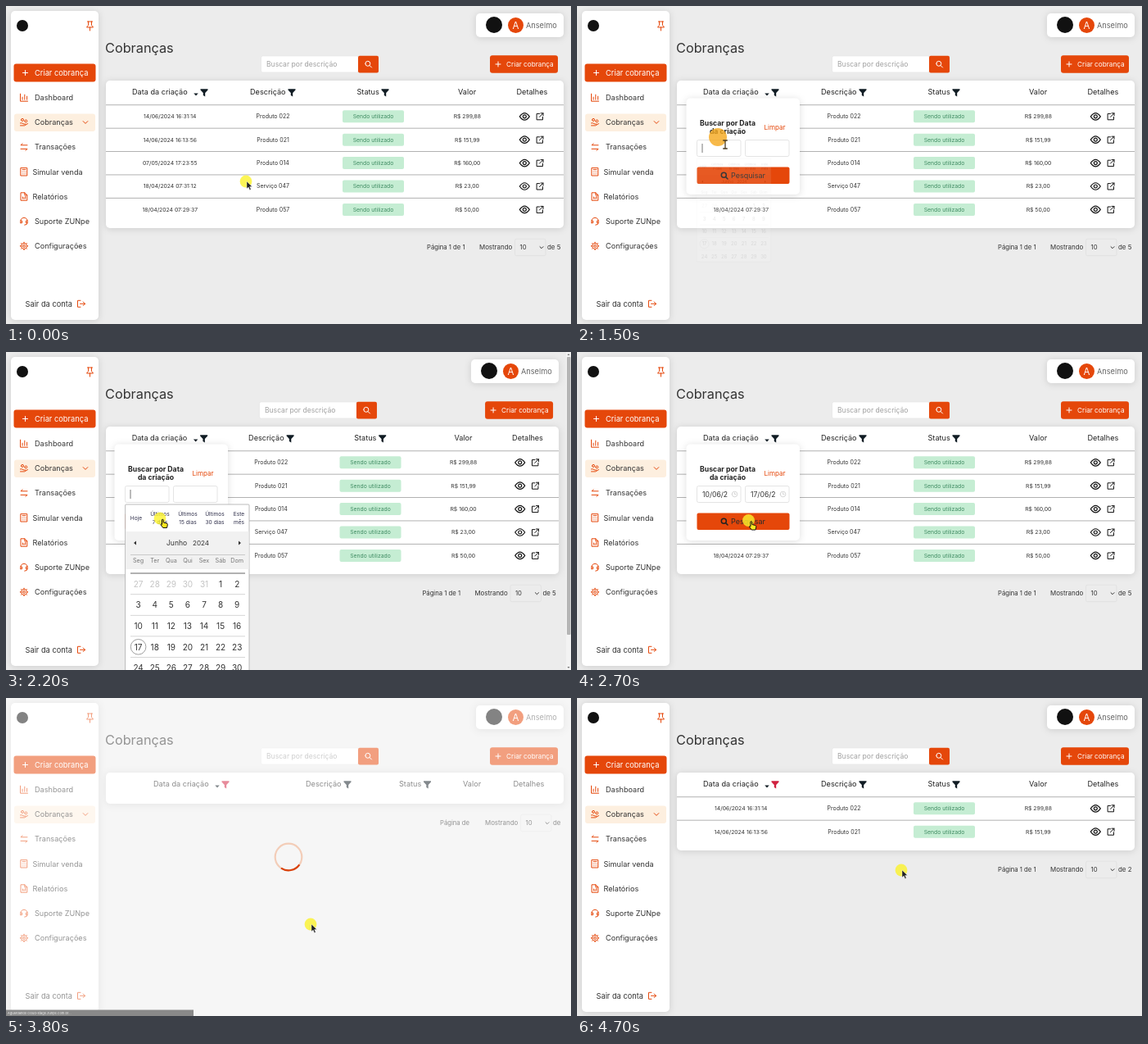
An HTML page that plays this animation: 690 px wide and 388 px high, repeating every 5.7 s.

```html
<!DOCTYPE html>
<html lang="pt-BR">
<head>
<meta charset="utf-8">
<title>Cobranças</title>
<style>
html, body { margin: 0; height: 100%; overflow: hidden; background: #ececec }
svg { display: block; width: 100vw; height: 100vh; font-family: Inter, "Open Sans", sans-serif }
.card { fill: #fff; filter: drop-shadow(0 1px 4px #0002) }
</style>
</head>
<body>
<svg id="stage" viewBox="0 0 690 388"></svg>
<script>
const LOOP = 5700, STEP = 100;
const ORANGE = '#e5470a', INK = '#333', DARK = '#111c24';
const stage = document.getElementById('stage');

const rect = (x, y, w, h, fill, r = 0, more = '') =>
  `<rect x="${x}" y="${y}" width="${w}" height="${h}" rx="${r}" fill="${fill}" ${more}/>`;
const card = (x, y, w, h) => rect(x, y, w, h, '#fff', 5, 'class="card"');
const disc = (x, y, r, fill, more = '') => `<circle cx="${x}" cy="${y}" r="${r}" fill="${fill}" ${more}/>`;
const text = (x, y, s, size, fill = INK, more = '') =>
  `<text x="${x}" y="${y}" font-size="${size}" fill="${fill}" ${more}>${s}</text>`;
const mid = (x, y, s, size, fill, more = '') => text(x, y, s, size, fill, 'text-anchor="middle" ' + more);
const line = (x, y, d, color = ORANGE, w = 1) =>
  `<path transform="translate(${x} ${y})" d="${d}" fill="none" stroke="${color}" stroke-width="${w}" stroke-linecap="round" stroke-linejoin="round"/>`;
const solid = (x, y, d, fill) => `<path transform="translate(${x} ${y})" d="${d}" fill="${fill}"/>`;
const group = (s, more) => `<g ${more}>${s}</g>`;
const ring = (x, y, r) => `M${x - r} ${y}a${r} ${r} 0 1 0 ${2 * r} 0a${r} ${r} 0 1 0 ${-2 * r} 0`;

const plus = (x, y) => line(x, y, 'M-3 0h6M0-3v6', '#fff');
const lens = (x, y, color, w) => line(x, y, ring(-.7, -.7, 3) + 'M1.6 1.6l2.4 2.4', color, w);
const funnel = (x, y, fill) => solid(x, y, 'M-4.5-4.5h9v1.2l-3.3 3.6v4.4l-2.4-1.6v-2.8l-3.3-3.6z', fill);
const chevron = (x, y, color, r = 2.8) => line(x, y, `M${-r} ${-r / 2}l${r} ${r}l${r} ${-r}`, color);

const MENU = [
  ['Dashboard', 35, 'M-4.5-4.5v9h9M-2 2.5v-3M.8 2.5v-6M3.6 2.5v-4'],
  ['Cobranças', 35, ring(-2, -3, 1.5) + ring(2.3, -1.5, 1.5) + 'M-4.5 1h2l2.5 1.2h2M-4.5 4h5l4-2.3'],
  ['Transações', 35, 'M4-2.3h-8l2-2M-4 2.3h8l-2 2'],
  ['Simular venda', 32.5, 'M-3.8-4.7h7.6v9.4h-7.6zM-2-2.6h4M-2 0h.1M0 0h.1M2 0h.1M-2 2.5h.1M0 2.5h.1M2 2.5h.1'],
  ['Relatórios', 32.5, 'M-3.6-4.7h4.4l3 3v6.4h-7.4zM.8-4.7v3h3M-1.6 2.5v-2M0 2.5v-1M1.7 2.5v-3'],
  ['Suporte ZUNpe', 35, 'M-4.2 2v-2.2a4.2 4.2 0 0 1 8.4 0v2.2h-1.8v-2.6h1.8M-4.2 2h1.8v-2.6h-1.8M4.2 2q0 2.5-3.5 2.5'],
  ['Configurações', 35, ring(0, 0, 1.5) + ring(0, 0, 3.6) + 'M0-4.8v1M0 4.8v-1M-4.8 0h1M4.8 0h-1M-3.4-3.4l.7.7M3.4 3.4l-.7-.7M3.4-3.4l-.7.7M-3.4 3.4l.7-.7']
];
const ROWS = [
  ['14/06/2024 16:31:14', 'Produto 022', '299,88'],
  ['14/06/2024 16:13:56', 'Produto 021', '151,99'],
  ['07/05/2024 17:23:55', 'Produto 014', '160,00'],
  ['18/04/2024 07:31:12', 'Serviço 047', '23,00'],
  ['18/04/2024 07:29:37', 'Produto 057', '50,00']
];

function sidebar() {
  let s = card(6, 6, 107, 377) + disc(20, 24, 7, '#111');
  s += line(102.5, 24, 'M-3-5h6M-2-5v4.5l-2 2.5h8l-2-2.5v-4.5M0 2v4');
  s += rect(9.5, 70.5, 100, 22, ORANGE, 3) + plus(23.5, 81.5) + text(35, 84.8, 'Criar cobrança', 9.3, '#fff');
  s += rect(10, 131.5, 99, 21.5, '#fdefdf', 3) + chevron(97, 142, ORANGE);
  MENU.forEach(([name, x, icon], i) => {
    const y = 111.7 + i * 30.2;
    s += line(22, y, icon) + text(x, y + 3.3, name, 9.15);
  });
  return s + text(23.5, 366.5, 'Sair da conta', 9.25) +
    line(92, 363.3, 'M-1-4h-3.5v8h3.5M-1.5 0h6M2.2-2.3l2.3 2.3l-2.3 2.3');
}

// The scrollbar narrows the page; things move left in proportion to x.
function page({ scrolled, rows, red, empty }) {
  const X = x => scrolled ? x - (x - 122) / 93 : x;
  const at = (x, s) => group(s, `transform="translate(${X(x) - x} 0)"`);
  let s = at(681, card(574, 9, 107, 29) + disc(596, 23, 10, '#111') + disc(622.5, 23.5, 9.5, ORANGE) +
    mid(622.5, 27.7, 'A', 11.5, '#fff') + text(635, 27, 'Anselmo', 9.2, '#666'));
  s += text(121, 56.8, 'Cobranças', 16.3);
  s += at(311, rect(311.5, 61, 119, 20, '#fff', 2, 'stroke="#e2e2e2" stroke-width=".6"') +
    text(318, 74.3, 'Buscar por descrição', 8.55, '#a0a0a0') +
    rect(430, 60.7, 25, 20.8, ORANGE, 2) + lens(442.5, 71, '#fff'));
  s += at(673, rect(591, 60.2, 83, 21.6, ORANGE, 3) + plus(601, 71) + text(611, 74, 'Criar cobrança', 8.2, '#fff'));

  const height = empty ? 38 : rows > 2 ? 180 : 95;
  s += card(122, 91, X(681) - 122, height);
  const heads = [['Data da criação', 154, 180, 88], ['Descrição', 298, 366, 51],
    ['Status', 428.5, 480, 34.5], ['Valor', 552, 558], ['Detalhes', 623.5, 619.5]];
  heads.forEach(([name, full, bare, gap], i) => {
    const x = empty ? bare : full;
    s += at(x, text(x, 108.4, name, 9.15, '#222') +
      (gap ? funnel(x + gap, 105.8, i || !red ? DARK : '#d0213f') : '') +
      (i ? '' : solid(x + 78, 108, 'M-2.7-1.4h5.4l-2.7 2.8z', DARK)));
  });
  for (let i = 0; i < rows; i++) {
    const y = 134.8 + i * 28.4, [date, name, value] = ROWS[i];
    s += rect(122, y - 14.5, X(681) - 122, .9, '#aaa');
    s += at(200, mid(200.3, y + 2.4, date, 6.8)) + at(326, mid(326, y + 2.4, name, 7));
    s += at(448, rect(411, y - 7.5, 75, 15, '#c5edd3', 2) + mid(448.5, y + 2.4, 'Sendo utilizado', 6.8, '#3f8b62'));
    s += at(563, mid(563.3, y + 2.4, 'R$ ' + value, 6.8));
    s += at(642, line(633.3, y, 'M-6 0q6-8.5 12 0q-6 8.5-12 0z' + ring(0, 0, 2), '#111', 1.2) +
      line(652, y, 'M-.5-3.4h-3.4v7.4h7.4v-3.4M1-4h3v3M4-4l-4.6 4.6', '#111'));
  }

  const y = 91 + height + 23.7, total = empty ? '' : rows;
  const dx = empty ? 7 : 0;
  s += at(640, group(
    text(empty ? 523 : 514, y + 2.7, empty ? 'Página de' : 'Página 1 de 1', 7.7) +
    text(578, y + 2.7, 'Mostrando', 7.9) +
    rect(621.5, y - 10.5, 37.5, 20.5, 'none', 2, 'stroke="#dedede" stroke-width=".7"') +
    text(627.5, y + 2.7, '10', 7.7) + chevron(654, y, INK, 2) + text(661, y + 2.7, 'de ' + total, 7.9),
    `transform="translate(${dx} 0)"`));
  if (scrolled) s += rect(684, 0, 6, 388, '#f3f3f3') + rect(685, 6, 4.5, 339, '#b5b5b5', 1) +
    solid(687, 3, 'M-1.5 1h3l-1.5-2z', '#777') + solid(687, 385, 'M-1.5-1h3l-1.5 2z', '#777');
  return s;
}

function popup({ filled, caret, hover }) {
  let s = card(133.5, 112.5, 138.5, 117.5);
  s += mid(184, 145.6, 'Buscar por Data', 8.7, '#222', 'font-weight="700"') +
    mid(184, 156.2, 'da criação', 8.7, '#222', 'font-weight="700"') + text(228.5, 151, 'Limpar', 8, ORANGE);
  [[146.5, '10/06/2'], [205.5, '17/06/2']].forEach(([x, date]) => {
    s += rect(x, 163.5, 53.5, 20, '#fff', 2, 'stroke="#ddd" stroke-width=".8"');
    if (filled) s += text(x + 6.5, 176.7, date, 8.6) + rect(x + 37.5, 165, 14, 17, '#fff') +
      line(x + 46, 173.5, ring(0, 0, 3.3) + 'M0-1.8v1.8h1.5', '#ccc', .8);
  });
  if (caret) s += rect(152.6, 168, .8, 11, '#555');
  return s + rect(146.5, 196.5, 113, 20.5, hover ? '#e95721' : ORANGE, 2) +
    lens(180, 207, '#222', 1.5) + text(188, 210.2, 'Pesquisar', 9, '#2b2b2b');
}

function calendar() {
  let s = rect(145.6, 186, 151.4, 210, '#fff', 1, 'stroke="#aaa" stroke-width=".8"') +
    rect(146, 219, 150.5, 46, '#f1f1f1');
  const presets = [['Hoje', 159], ['Últimos', 188, '7 dias'], ['Últimos', 222, '15 dias'],
    ['Últimos', 255, '30 dias'], ['Este', 284.5, 'mês']];
  for (const [top, x, low] of presets)
    s += mid(x, low ? 200.3 : 205, top, 6.6, '#2e2e4a') + (low ? mid(x, 210, low, 6.6, '#2e2e4a') : '');
  s += text(196, 236, 'Junho', 8.5) + text(228, 236, '2024', 8.1) +
    solid(157.5, 233, 'M1.5-2.5v5l-3-2.5z', INK) + solid(285.5, 233, 'M-1.5-2.5v5l3-2.5z', INK) +
    rect(152, 247.3, 140, .7, '#bbb') + rect(152, 269.5, 140, 1, '#666');
  'Seg Ter Qua Qui Sex Sáb Dom'.split(' ').forEach((d, i) => s += mid(161.6 + i * 20.1, 257, d, 7.2, '#777'));
  for (let i = 0; i < 35; i++) {
    const x = 161.6 + i % 7 * 20.1, y = 283 + Math.floor(i / 7) * 25.6, day = i < 5 ? 27 + i : i - 4;
    if (i % 7 === 0) s += rect(152, y + 12.3, 140, .8, '#ccc');
    if (day === 17) s += disc(x, y, 9.3, 'none', 'stroke="#888" stroke-width=".8"');
    s += mid(x, y + 3.7, day, 10, i < 5 ? '#c4c4c4' : INK);
  }
  return s;
}

const PATH = [[0, 293, 214], [600, 240, 105], [1100, 240, 105], [1400, 172, 160], [1700, 172, 160],
  [2200, 188, 203], [2400, 188, 203], [3000, 231, 208], [3500, 231, 208], [3800, 372, 276],
  [4100, 395, 207], [4700, 396, 210], [LOOP, 396, 210]];
const CLICKS = [[700, 900, 11], [1500, 1600, 11], [2400, 2500, 11], [3200, 3300, 8.5]];

function pointer(t) {
  const i = PATH.findIndex(p => p[0] > t), [a, ax, ay] = PATH[i - 1], [b, bx, by] = PATH[i];
  const u = (t - a) / (b - a), k = u * u * (3 - 2 * u);
  const x = ax + (bx - ax) * k, y = ay + (by - ay) * k;
  const click = CLICKS.find(([from, to]) => t >= from && t < to);
  let s = disc(x, y, click ? click[2] : 7.4, click ? '#f5a81c' : '#fbf32c', 'opacity=".8"');
  if (t >= 1300 && t < 1800)
    return s + line(x + 9, y + 9, 'M-2.3-5h4.6M0-5v10M-2.3 5h4.6', '#4a3a20', 1.3);
  const hand = t >= 500 && t < 3600;
  const shape = hand
    ? 'M2.5 1.5q1.3-1 1.8.5v3l4 1q1.2.4 1 1.8l-.8 3.7h-4.8l-2.9-4q.3-1 1.7-.1z'
    : 'M1 0v9l2.1-1.9l1.5 3.3l1.6-.7l-1.5-3.2h2.9z';
  return s + `<path transform="translate(${x} ${y})" d="${shape}" fill="${hand ? '#ffe81f' : '#222'}" stroke="${hand ? '#111' : '#fff'}" stroke-width="${hand ? 1 : .4}"/>`;
}

const within = (t, a, b) => t >= a && t < b;

function scene(t) {
  const loading = within(t, 3600, 4000);
  const scrolled = within(t, 1600, 2600);
  let s = rect(0, 0, 690, 388, '#ececec') + sidebar() + page({
    scrolled, empty: loading, red: t >= 3200,
    rows: loading ? 0 : t < 3600 ? 5 : 2
  });
  if (within(t, 900, 3600)) {
    const shift = scrolled ? -1 : 0;
    s += group(popup({ filled: t >= 2500, caret: within(t, 1500, 2500), hover: t >= 2900 }),
      `opacity="${t < 1000 ? .6 : 1}" transform="translate(${shift} 0)"`);
  }
  if (within(t, 1500, 2600)) {
    const [alpha, size] = t === 1500 ? [.1, .6] : t === 1600 ? [.8, .93] : t === 2500 ? [.4, 1] : [1, 1];
    s += group(calendar(), `opacity="${alpha}" transform="translate(146.5 186) scale(${size}) translate(-146.5 -186)"`);
  }
  if (within(t, 3200, 4000))
    s += rect(0, 380.5, 229, 8, '#1c1c1c') + text(2, 386, 'Aguardando cloud-stage.zunpe.com.br...', 4, '#ddd');
  if (within(t, 3600, 4100)) s += rect(0, 0, 690, 388, '#fff', 0, `opacity="${t < 4000 ? .48 : .2}"`);
  if (loading) s += disc(345, 194, 16.3, 'none', 'stroke="#f3cdb8" stroke-width="2.2"') +
    disc(345, 194, 16.3, 'none', `stroke="#d9420d" stroke-width="2.2" stroke-dasharray="25 100" transform="rotate(${35 + (t - 3800) * .36} 345 194)"`);
  return s + pointer(t);
}

let shown = -1;
function tick() {
  const t = Math.floor(performance.now() % LOOP / STEP) * STEP;
  if (t !== shown) stage.innerHTML = scene(shown = t);
  requestAnimationFrame(tick);
}
tick();
</script>
</body>
</html>
```
